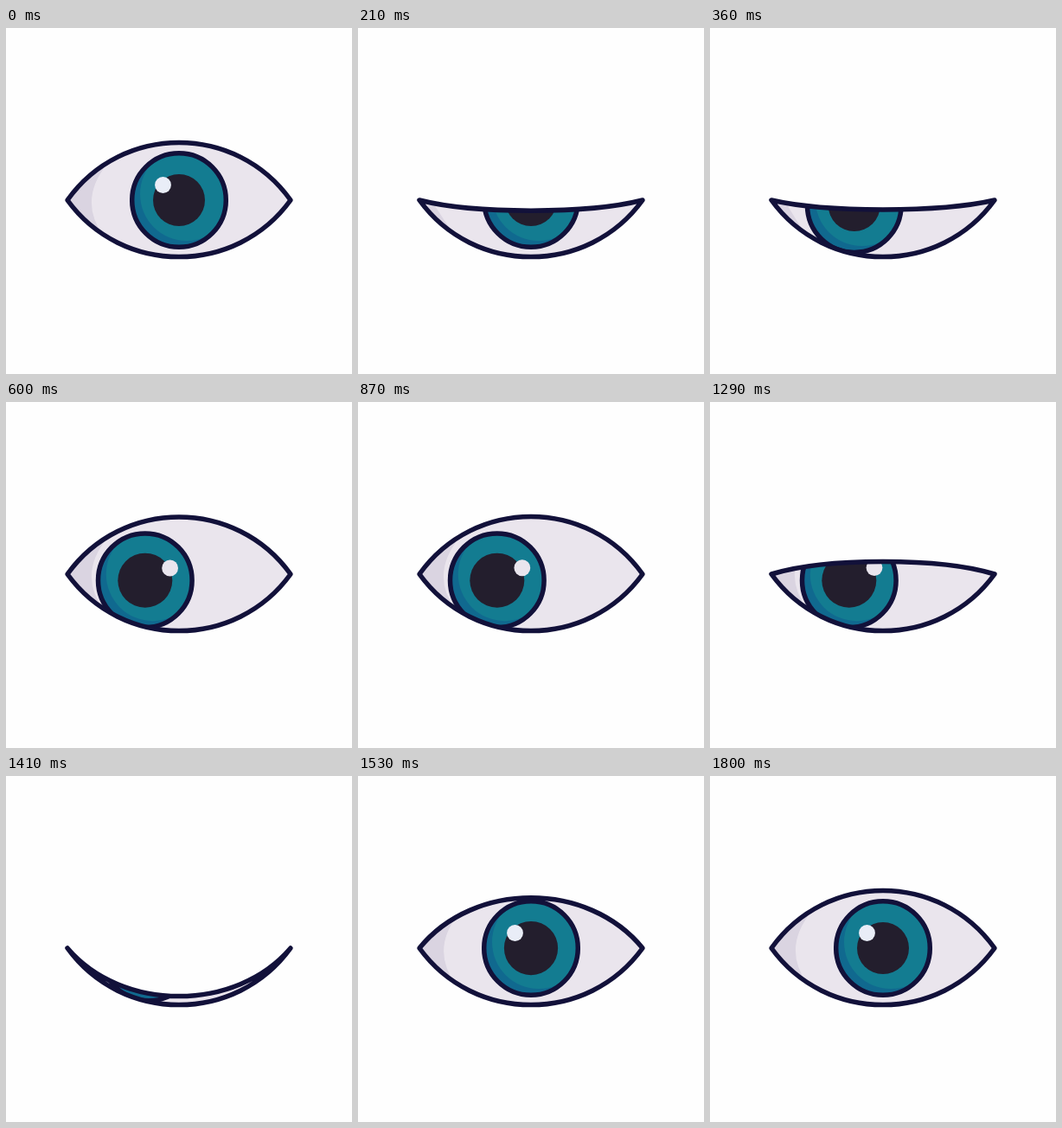
An HTML page that plays this animation: 400 by 400 pixels, repeating every 4.86 s.

```html
<!DOCTYPE html>
<html lang="en">
<head>
<meta charset="utf-8">
<title>Blinking eye</title>
<style>
  html, body { margin: 0; width: 100%; height: 100%; overflow: hidden; background: #fefefe; }
  svg { display: block; width: 100%; height: 100%; }
</style>
</head>
<body>
<svg viewBox="0 0 400 400">
  <defs>
    <clipPath id="opening"><path class="eye"/></clipPath>
    <clipPath id="disc"><circle r="54.3"/></clipPath>
  </defs>
  <g clip-path="url(#opening)">
    <rect x="60" y="120" width="280" height="160" fill="#eae5ed"/>
    <path id="shade" fill="#dad4e1"/>
    <g id="iris">
      <circle r="54.3" fill="#10698f"/>
      <circle cx="9" cy="-7" r="54" fill="#137c91" clip-path="url(#inner)"/>
      <circle r="54.3" fill="none" stroke="#12113a" stroke-width="5.5"/>
      <circle id="pupil" fill="#231e2d"/>
    </g>
    <circle id="glint" r="9.4"/>
  </g>
  <path class="eye" fill="none" stroke="#12113a" stroke-width="5.5" stroke-linejoin="round"/>
</svg>
<script>
  const LOOP = 4860, STEP = 30, SECOND = 1100;
  const OPEN = 132.5, WIDE = 129, SHUT = 264;
  const $ = id => document.getElementById(id);
  const eyes = document.querySelectorAll('.eye');

  // Keep the light part of the iris inside its rim.
  const rim = $('disc').cloneNode(true);
  rim.id = 'inner';
  rim.firstElementChild.setAttribute('cx', 0);
  $('disc').replaceWith(rim);

  const mix = (a, b, k) => a + (b - a) * k;
  const ease = (t, from, to) => {
    const u = Math.min(1, Math.max(0, (t - from) / (to - from)));
    return (1 - Math.cos(Math.PI * u)) / 2;
  };
  const set = (el, attrs) => {
    for (const name in attrs) el.setAttribute(name, attrs[name]);
  };

  // Small lift, shut, open too wide, settle.
  const lidKeys = [[0, OPEN], [120, WIDE], [278, SHUT], [466, WIDE], [580, 133], [690, OPEN]];
  function lidAt(t) {
    let y = OPEN;
    for (let i = 1; i < lidKeys.length; i++) {
      const [a] = lidKeys[i - 1], [b, to] = lidKeys[i];
      if (t > a) y = mix(y, to, ease(t, a, b));
    }
    return y;
  }

  function draw(time) {
    const t = Math.floor(time / STEP + 1e-6) * STEP;
    const second = t - SECOND;
    const lid = lidAt(second > 0 ? second : t);
    const swing = (from, to) => ease(t, from, to) - ease(second, from, to);
    const look = swing(290, 384);
    const dilate = swing(350, 590);
    const drift = ease(t, 560, 1110) - ease(second, 290, 384);

    const bend = 199 + (lid - 199) * 4 / 3;
    const d = `M71 199C134.2 ${bend} 265.8 ${bend} 329 199C265.8 286.4 134.2 286.4 71 199Z`;
    eyes.forEach(el => set(el, { d }));

    // The corner shade is pressed flat along with the lid.
    const drop = lid - OPEN;
    const topX = Math.max(71, 118 - drop * 0.37);
    const topY = 156 + drop * 0.63;
    set($('shade'), {
      d: `M60 ${topY}H${topX}Q${82.5 + drop * 0.22} ${(topY + 241) / 2} 113 241L60 250Z`
    });

    set($('iris'), { transform: `translate(${mix(200, 160.8, look)} ${mix(199, 206.2, look)})` });
    set($('pupil'), { r: mix(30, 31.5, dilate) });
    set($('glint'), {
      cx: mix(181.5, 189.6, look) + 0.4 * drift,
      cy: mix(181.5, 192, look) - 0.4 * drift,
      fill: look > 0.5 ? '#e9e5ed' : '#e9edf7'
    });
  }

  const start = performance.now();
  function tick() {
    draw((performance.now() - start) % LOOP);
    requestAnimationFrame(tick);
  }
  tick();
</script>
</body>
</html>
```
